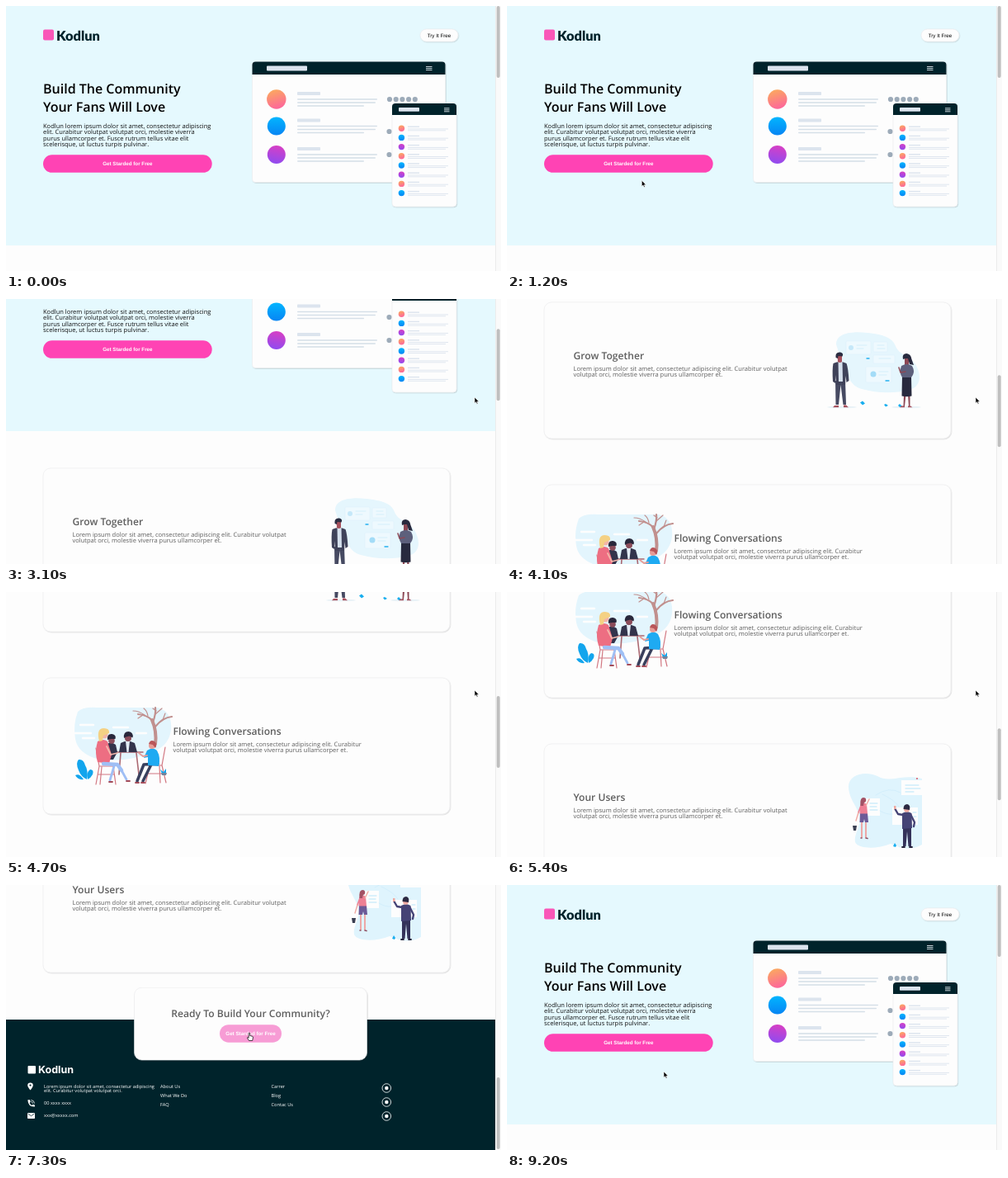
Animation of 600 by 321 pixels, one loop 9.3 s. Source, as an HTML page:

```html
<!DOCTYPE html>
<html lang="en">
<head>
<meta charset="utf-8">
<title>Landing page scroll</title>
<style>
  html, body { margin: 0; width: 100%; height: 100%; overflow: hidden; background: #fdfdfd; }
  svg { display: block; }
  text { font-family: "Open Sans", sans-serif; white-space: pre; text-rendering: geometricPrecision; }
  .semi { font-weight: 600; }
  .arial { font-family: "Liberation Sans", Arial, sans-serif; text-anchor: middle; font-size: 6.25px; }
  .bold { font-weight: 700; fill: #fff; }
  .pink { fill: #ff43b4; }
  .pink.hover { fill: #f79cd5; }
  .try.hover { opacity: .6; }
  .panel { fill: #fdfdfd; stroke: #ebebed; stroke-width: .6; filter: url(#shadow); }
  .line { fill: none; stroke-linecap: round; stroke-linejoin: round; }
</style>
</head>
<body>
<svg width="600" height="321" viewBox="0 0 600 321">
  <defs>
    <linearGradient id="orange" x1=".3" y1="0" x2=".6" y2="1"><stop stop-color="#fba95f"/><stop offset="1" stop-color="#fd659c"/></linearGradient>
    <linearGradient id="blue" x1="0" y1="0" x2="0" y2="1"><stop stop-color="#02b5ff"/><stop offset="1" stop-color="#0785f3"/></linearGradient>
    <linearGradient id="purple" x1=".6" y1="0" x2=".4" y2="1"><stop stop-color="#d83fc4"/><stop offset="1" stop-color="#8f4bf0"/></linearGradient>
    <filter id="shadow" x="-10%" y="-10%" width="120%" height="125%">
      <feDropShadow dx=".6" dy=".7" stdDeviation=".7" flood-color="#000" flood-opacity=".2"/>
    </filter>
  </defs>

  <g id="page">
    <rect width="600" height="1157" fill="#fdfdfd"/>
    <rect width="593" height="290" fill="#e5f9fe"/>
    <g id="hero"></g>
    <g id="cards"></g>

    <!-- two people beside floating cards -->
    <g transform="translate(0 331)">
      <path fill="#e5f6fd" d="M399 55C399 40 421 39 437 41C455 43 467 46 471 57C475 68 487 67 495 79C503 92 502 107 487 110C470 115 448 114 430 109C412 104 413 86 405 74Z"/>
      <g fill="#eef9fe" stroke="#d8effa" stroke-width=".5">
        <rect x="411" y="51" width="30" height="16" rx="1"/><rect x="444" y="52" width="17" height="12" rx="1"/>
        <rect x="435" y="82" width="31" height="19" rx="1"/><rect x="444" y="68" width="26" height="10" rx="1"/>
      </g>
      <path class="line" stroke="#cdebf9" stroke-width=".8" d="M424 56h12M424 60h8M449 56h8M449 60h9M451 88h11M451 92h9M451 72h14"/>
      <circle cx="417" cy="59" r="3" fill="#c5e8f9"/><circle cx="444" cy="91" r="3.500" fill="#a3dcf7"/>
      <path class="line" stroke="#25b0ef" stroke-width="1.300" d="M459 99h4M436 72h3"/>
      <g fill="#e9f2f7"><ellipse cx="406" cy="131" rx="18" ry="1.300"/><ellipse cx="484" cy="131" rx="18" ry="1.300"/></g>
      <g fill="#18aeef"><path d="M428 125.500l3-2 3 3-3 2zM457 128l2-1 3 2-3 1.500zM474 129l2-2 3 3-3 1z"/></g>

      <path fill="#464a62" d="M398 99h12l1 29h-3.500l-3-24-2.500 24h-3.500z"/>
      <path fill="#a6505c" d="M397 129h5v2.300h-7zM408 128.500h3l3 2.800h-6z"/>
      <path fill="#3f4259" d="M395.500 78q8-4 16 0 2 5 3 21l-3 2-1-8-.5 11h-4l-1-20-1 20h-5v-12l-1 10-3-2q-1-15 .5-22z"/>
      <path fill="#d5e0ec" d="M401.500 76h5l.5 24h-5z"/>
      <path fill="#a6505c" d="M400.500 69h5.500v7q-2.500 2-5 0z"/>
      <path fill="#2b2d42" d="M398.500 71q-1-7 5.500-6.500 4.500 1 2.500 5l-5-.5-.5 3z"/>

      <path fill="#8c4855" d="M482 71h5v9h-5zM481 116h2.500l-1.500 14h-1.500zM486 116h2.500v14h-1.500z"/>
      <path fill="#282a3e" d="M480 73q-1.500-7 4.500-7 5 .5 6 7l2.500 7-5-1-2-7-3 0zM479 94h11l.5 23.500q-6 1.500-12 0z"/>
      <path fill="#5d607c" d="M478 81q7-4 13 0 3.500 6 1 11l-2 3h-11q-4-6-1-14z"/>
      <path class="line" stroke="#8c4855" stroke-width="1.500" d="M475 83l2 6 6-1"/>
      <path fill="#a6505c" d="M478 129.500h4v1.800h-6zM486 129.500h3l2.500 1.800h-5.500z"/>
    </g>

    <!-- group around a table under a tree -->
    <g transform="translate(0 593)">
      <path fill="#e3f5fd" d="M87 4Q93-2 110-1H184Q202 4 200 26Q198 43 182 51Q150 66 113 62Q87 55 84 37Q81 20 87 4Z"/>
      <path class="line" stroke="#fdfdfd" stroke-width="2.500" d="M83 30h20M90 20h16M93 36h14M158 30h12M130 23h18"/>
      <g class="line" stroke="#c1908e">
        <path stroke-width="4" d="M181 43Q183 28 177 14"/>
        <path stroke-width="2.200" d="M178 18Q176 9 160 7M178 17Q182 6 181 -1M181 22Q190 11 201 10"/>
        <path stroke-width="1.200" d="M168 8Q161 3 154 3M166 8L160 12M172 9Q171 3 167 0M181 7L189 0M190 14L193 6M182 3L178 0"/>
      </g>
      <g class="line" stroke="#d27781" stroke-width="1.200">
        <path d="M109 48L113 70H130M113 70L109 92M130 70L133 92M116 71L114 92M112 80H131M193 47L189 69H172M189 69L194 90M174 70L169 91M186 70L187 90M172 79H190"/>
        <path d="M131 53H166M139 54L137 80M158 54L161 80" stroke="#ab6871" stroke-width="1.600"/>
      </g>
      <path fill="#33344c" d="M121 44q6-5 12 0l2 9-5 9h-6zM139 42q8-5 17 0l3 11h-22z"/>
      <path fill="#e3ecf6" d="M145 40h5l-1.500 13h-2z"/>
      <g fill="#8b4c5a"><circle cx="128" cy="39" r="3.800"/><circle cx="148" cy="36" r="4"/></g>
      <path fill="#29273b" d="M123 38q-1-7.500 5.500-7 5.500 1 4 6l-5 0zM143 36q-1-8 5.500-8 6.500 1 5 7.500l-4-2-4 1z"/>
      <path fill="#ed6e82" d="M111 40q7-4 12 0l5 16-3 11-14-2q-4-12 0-25z"/>
      <circle cx="119" cy="32" r="4.500" fill="#f3b5aa"/>
      <path fill="#f4d184" d="M113 40q-4-16 5.500-16 7.500 0 6.500 6l-7 3-1 6z"/>
      <path class="line" stroke="#f3b5aa" stroke-width="1.800" d="M122 46l5 10 8-2"/>
      <path class="line" stroke="#9fbff5" stroke-width="4.500" d="M118 67l17 1 5 7"/>
      <path class="line" stroke="#9fbff5" stroke-width="2.800" d="M140 75l6 11M131 70l-5 17"/>
      <path class="line" stroke="#39405d" stroke-width="3.500" d="M184 67l-17 1-8 20M176 68l-10 20"/>
      <path fill="#1eaaf2" d="M171 51q7-5 12 0 5 9 2 19l-13-1 0-10-5 1z"/>
      <path class="line" stroke="#e69c97" stroke-width="1.800" d="M171 57l-5 1-5-4"/>
      <circle cx="177" cy="45" r="4" fill="#e69c97"/>
      <path fill="#b9565a" d="M173 43q2-6 7-3 4 3 1 8l-3-4z"/>
      <path fill="#13a5ed" d="M98 86q-7-3-10-11-4-9 0-13 6-1 8 7 4 6 2 17z"/>
      <path fill="#13a5ed" d="M99 86q-2-9 3-12 5 0 3 6-2 4-6 6zM94 86q-7 1-10-5 5-3 10 5zM189 79l-2-5 4 3 3-4 0 6z"/>
      <path fill="#74849b" d="M188 78h7l-1 3h-5z"/>
      <path class="line" stroke="#a34b59" stroke-width="1.800" d="M125 89h4M146 88h4M157 90h4M164 90h4"/>
    </g>

    <!-- two people at a board -->
    <g transform="translate(0 766)">
      <path fill="#dff4fd" d="M414 64C413 48 434 43 449 50C464 59 480 47 503 53V133C490 141 476 137 465 132C448 139 425 138 422 130C420 120 430 110 427 98C424 86 415 78 414 64Z"/>
      <g fill="#fdfdfd"><rect x="478" y="55" width="25" height="18"/><rect x="435" y="77" width="17" height="21"/><rect x="467" y="88" width="31" height="21"/></g>
      <path class="line" stroke="#a5dff8" stroke-width=".8" d="M483 61h16M483 65h18M483 69h10M440 83h9M440 87h8M440 91h9M492 94h4M493 99h3"/>
      <path class="line" stroke="#caeafa" stroke-width=".6" d="M447 73Q463 62 477 70M452 92Q460 97 467 96M455 72Q470 79 475 87"/>
      <circle cx="497" cy="53" r="1" fill="#dc5563"/>

      <path class="line" stroke="#eda8a6" stroke-width="2" d="M430 104l0 20M435 104l0 20"/>
      <path fill="#6d5a97" d="M428 95h9l1 11h-4l-1-4-1 4h-4.500z"/>
      <path fill="#ee7f94" d="M428.500 84q4-2.500 7.500 0l1 11.500h-9.500z"/>
      <path class="line" stroke="#ee7f94" stroke-width="1.800" d="M429 86l-3 8"/>
      <path class="line" stroke="#f0a9a2" stroke-width="1.400" d="M426 94l-3 10M435 86l4-8"/>
      <circle cx="432" cy="80" r="2.800" fill="#f0a9a2"/>
      <path fill="#a35265" d="M428.500 86q-1-10 3.500-10 4 0 3 4.500-3 1-3 5.500z"/>
      <path fill="#3a3f52" d="M419 110h5l-1 6h-3z"/>
      <path class="line" stroke="#8d4e60" stroke-width="1.600" d="M429 125h1M435 125l2 .500"/>

      <path fill="#34325a" d="M480 111h10l0 24h-3.500l-1.500-18-1.500 18h-3.500z"/>
      <path fill="#454375" d="M479 95q6-3.500 11.500 0l.5 18-12 1z"/>
      <path class="line" stroke="#454375" stroke-width="2.400" d="M480 97l-6-1-3.500-6M489.500 97l4.500 9-1 5"/>
      <path fill="#efaaa2" d="M469 86h2.500v4h-2.500z"/><circle cx="484.500" cy="90.500" r="3.300" fill="#efaaa2"/>
      <path fill="#2c2942" d="M480.500 90q0-6 4.500-6 4.500 1 3 7z"/>
      <path class="line" stroke="#25223a" stroke-width="1.800" d="M479 136h3M488 136h3"/>
      <path fill="#18aeef" d="M468 135l2-4 2 3-1 2z"/>
    </g>

    <g id="footer"></g>
  </g>

  <rect x="593" width="7" height="321" fill="#fafafa"/>
  <rect x="593" width=".7" height="321" fill="#e6e6e6"/>
  <rect id="thumb" x="594.700" width="4" height="87" rx="2" fill="#bfbfbf"/>

  <g id="cursor">
    <path id="arrow" fill="#000" stroke="#fff" stroke-width=".6" d="M0 0V7.200L1.700 5.700 2.800 8.200 4 7.700 2.900 5.300H5.200Z"/>
    <path id="hand" fill="#fff" stroke="#000" stroke-width=".7" stroke-linejoin="round"
      d="M-.8 .5Q0-.5 .7 .5V3.500L3.800 4.300Q4.700 4.700 4.400 6L3.700 9.500H-.5L-2.700 6Q-2.500 4.700-.8 6.200Z"/>
  </g>
</svg>

<script>
const $ = id => document.getElementById(id);
const rect = (x, y, w, h, fill, rx = 0) =>
  `<rect x="${x}" y="${y}" width="${w}" height="${h}" rx="${rx}" fill="${fill}"/>`;
const dot = (x, y, r, fill) => `<circle cx="${x}" cy="${y}" r="${r}" fill="${fill}"/>`;
const panel = (x, y, w, h, r) =>
  `<rect class="panel" x="${x}" y="${y}" width="${w}" height="${h}" rx="${r}"/>`;
const text = (x, y, size, fill, str, attrs = '') =>
  `<text x="${x}" y="${y}" font-size="${size}" fill="${fill}" ${attrs}>${str}</text>`;
const lines = (x, y, size, step, fill, list) =>
  list.map((s, i) => text(x, y + i * step, size, fill, s)).join('');

const DARK = '#00232b', BAR = '#dce4ee', GREY = '#5f5f5f';
const hues = ['orange', 'blue', 'purple'].map(n => `url(#${n})`);
const LOREM = 'orem ipsum dolor sit amet, consectetur adipiscing';

const pinkButton = (id, x, y, w) =>
  `<rect id="${id}" class="pink" x="${x}" y="${y}" width="${w}" height="21.500" rx="10.750"/>` +
  `<text class="arial bold" x="${x + w / 2}" y="${y + 13}">Get Starded for Free</text>`;

const topBar = (x, y, w, h) =>
  `<path fill="${DARK}" d="M${x} ${y + h}V${y + 4}q0-4 4-4H${x + w - 4}q4 0 4 4V${y + h}Z"/>`;
const burger = (x, y, w) =>
  [0, 2, 4].map(d => rect(x, y + d, w, .9, '#dfe7ec')).join('');

function mockup() {
  let s = panel(298.5, 67.5, 234, 146, 4) + topBar(298.5, 67.5, 234, 15.5) +
    rect(316, 72.5, 49, 6, BAR, 1) + burger(509, 73, 7.5);
  [113, 145.5, 180].forEach((y, i) => {
    s += dot(327.8, y, i ? 11 : 11.7, hues[i]) + rect(353, y - 9, 28, 4, BAR, .8);
    [97, 95, 81].forEach((w, k) => { s += rect(353, y - .8 + k * 4, w, 1.6, '#d5dfe8', .8); });
  });
  for (let i = 0; i < 5; i++) s += dot(465 + i * 7.7, 113, 3.1, '#9dabb9');
  s += dot(464.5, 152, 3.1, '#9dabb9') + dot(464.5, 180, 3.1, '#9dabb9');
  s += panel(468, 118, 78, 125, 4) + topBar(468, 118, 78, 14) +
    rect(476, 123, 25, 4.7, BAR, .8) + burger(531, 123.4, 6.5);
  for (let i = 0; i < 8; i++) {
    const y = 148.2 + i * 11.2;
    s += dot(479.4, y, 3.7, hues[i % 3]) + rect(487, y - 2.7, 14, 1.4, BAR) +
      rect(487, y + .3, 49, .9, BAR) + rect(487, y + 2.2, 46, .9, BAR);
  }
  return s;
}

$('hero').innerHTML =
  rect(45, 28.5, 13, 13, '#f957b8', 2) +
  text(61, 41.8, 16.4, DARK, 'Kodlun', 'style="font-family:Lato,sans-serif;font-weight:900"') +
  `<g id="try" class="try">${panel(502, 28, 46, 15, 7.5)}<text class="arial" x="525" y="37.700">Try It Free</text></g>` +
  text(45, 106.3, 16, '#000', 'Build The Community', 'class="semi"') +
  text(45, 128.1, 16, '#000', 'Your Fans Will Love', 'class="semi"') +
  lines(45, 147.7, 7.5, 7.5, '#111', [
    'Kodlun l' + LOREM,
    'elit. Curabitur volutpat volutpat orci, molestie viverra',
    'purus ullamcorper et. Fusce rutrum tellus vitae elit',
    'scelerisque, ut luctus turpis pulvinar.']) +
  pinkButton('start', 45, 180.3, 204.7) + mockup();

const card = (y, x, title, a, b) =>
  panel(45, y, 493, 165, 9) + text(x, y + 69, 12.1, GREY, title, 'class="semi"') +
  lines(x, y + 82.8, 7.5, 7.5, GREY, [a, b]);
const wide = ['L' + LOREM + ' elit. Curabitur volutpat', 'volutpat orci, molestie viverra purus ullamcorper et.'];
$('cards').innerHTML =
  card(335, 80.5, 'Grow Together', ...wide) +
  card(556, 202.5, 'Flowing Conversations', 'L' + LOREM + ' elit. Curabitur', 'volutpat ' + wide[1]) +
  card(777, 80.5, 'Your Users', ...wide);

const small = (x, y, step, list) => lines(x, y, 5.63, step, '#fff', list);
$('footer').innerHTML =
  rect(0, 999, 593, 158, DARK) + panel(155.5, 960.3, 282, 87.7, 9) +
  text(296.5, 996.3, 12.1, GREY, 'Ready To Build Your Community?', 'class="semi" text-anchor="middle"') +
  pinkButton('join', 259, 1005.2, 75) +
  rect(26.5, 1055, 9.5, 9.5, '#fff', 1) +
  text(39, 1064.3, 12.5, '#fff', 'Kodlun', 'style="font-family:Inter,sans-serif;font-weight:700"') +
  small(46, 1081.5, 5.63, ['L' + LOREM, 'elit. Curabitur volutpat volutpat orci.']) +
  small(46, 1102.2, 0, ['00 xxxx xxxx']) + small(46, 1117, 0, ['xxx@xxxxx.com']) +
  small(187, 1081.5, 11.2, ['About Us', 'What We Do', 'FAQ']) +
  small(321.5, 1081.5, 11.2, ['Carrer', 'Blog', 'Contac Us']) +
  `<path fill="#fff" d="M29.500 1084.500q-3.300-4-3.300-5.800a3.300 3.300 0 0 1 6.600 0q0 1.800-3.300 5.800z"/>` +
  dot(29.5, 1078.6, 1.1, DARK) +
  `<path fill="#fff" d="M27 1096.300h2l.7 2.500-1.200 1.300q1 2 2.900 2.800l1.300-1.200 2.200.7v2q-7.800.7-8.600-8z"/>
   <path class="line" stroke="#fff" stroke-width=".8" d="M30.800 1096.500q3.400.3 3.700 3.700M30.800 1098.500q1.500.2 1.700 1.700"/>` +
  rect(26, 1112, 9, 7, '#fff', .8) +
  `<path class="line" stroke="${DARK}" stroke-width=".8" d="M27 1113.300l3.500 2.400 3.500-2.400"/>` +
  [1082, 1099, 1116].map(y =>
    `<circle cx="461.300" cy="${y}" r="5.300" fill="none" stroke="#fff" stroke-width=".8"/>` + dot(461.3, y, 2.2, '#fff')).join('');

// [ms, values...]
const LOOP = 9300, STEP = 100, MAX = 836;
const scrollKeys = [[0, 0], [2450, 0], [4100, 331], [5400, 593], [6300, 766], [6700, MAX],
  [8150, MAX], [8500, 480], [8950, 0], [LOOP, 0]];
const cursorKeys = [[0, 505, -14], [100, 505, -10], [300, 522, 35], [500, 522, 36], [800, 170, 190],
  [1000, 160, 221], [1150, 160, 221], [1300, 170, 192], [1700, 523, 36], [2000, 526, 36],
  [2300, 576, 112], [2700, 568, 119], [5900, 568, 119], [6300, 566, 119], [6700, 560, 122],
  [7100, 295, 179], [7700, 295, 179], [8100, 190, 226], [LOOP, 190, 226]];
const targets = [['try', 502, 28, 46, 15], ['start', 45, 180, 205, 22], ['join', 259, 1005, 75, 22]];

function sample(keys, t) {
  const i = keys.findIndex(k => k[0] > t), a = keys[i - 1], b = keys[i];
  const p = (t - a[0]) / (b[0] - a[0]);
  return a.slice(1).map((v, k) => v + (b[k + 1] - v) * p);
}

function draw(t) {
  const scroll = Math.round(sample(scrollKeys, t)[0]);
  const [x, y] = sample(cursorKeys, t);
  let over = false;
  for (const [id, bx, by, w, h] of targets) {
    const py = y + scroll;
    const hit = x >= bx && x <= bx + w && py >= by && py <= by + h;
    $(id).classList.toggle('hover', hit);
    over = over || hit;
  }
  $('page').setAttribute('transform', `translate(0 ${-scroll})`);
  $('thumb').setAttribute('y', scroll / MAX * 233);
  $('cursor').setAttribute('transform', `translate(${x} ${y})`);
  $('arrow').style.display = over ? 'none' : '';
  $('hand').style.display = over ? '' : 'none';
}

const start = performance.now();
function tick() {
  const t = (performance.now() - start) % LOOP;
  draw(Math.floor(t / STEP) * STEP);
  requestAnimationFrame(tick);
}
tick();
</script>
</body>
</html>
```
